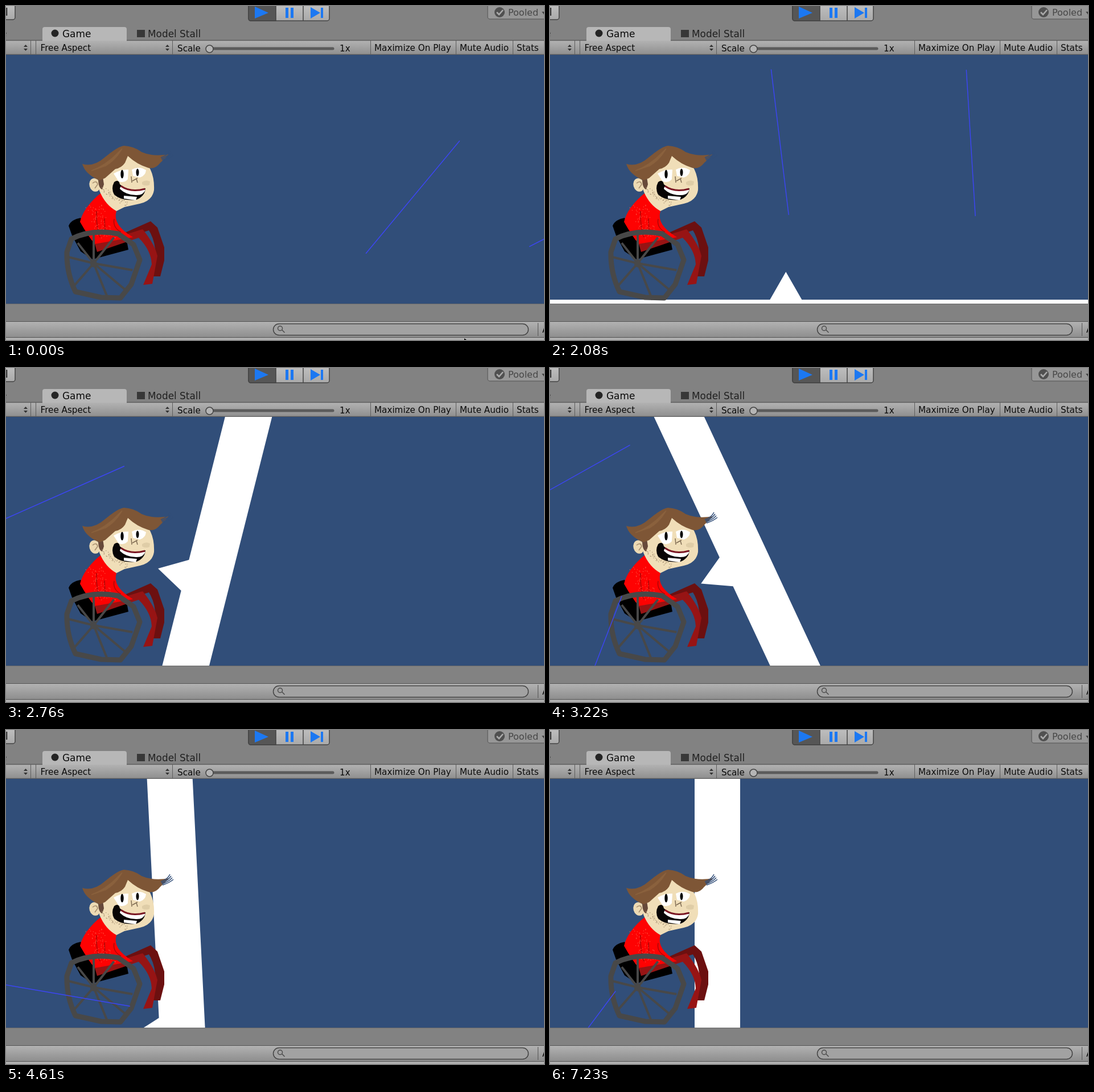
Animation of 945x588 px, one loop 7390 ms. Source, as an HTML page:

```html
<!DOCTYPE html>
<html lang="en">
<head>
<meta charset="utf-8">
<title>Wheelchair game view</title>
<style>
html, body { margin: 0; width: 100%; height: 100%; overflow: hidden; background: #828282; }
svg { display: block; }
text { font: 15.2px "DejaVu Sans", sans-serif; fill: #0b0b0b; }
.tab { font-size: 16.9px; }
.key { stroke: #444; stroke-width: 1.5; }
.line { fill: none; stroke-width: 1.5; }
</style>
</head>
<body>
<svg width="100%" height="100%" viewBox="0 0 945 588">
  <defs>
    <linearGradient id="bar" x2="0" y2="1"><stop stop-color="#b2b2b2"/><stop offset="1" stop-color="#8e8e8e"/></linearGradient>
    <linearGradient id="face" x2="0" y2="1"><stop stop-color="#c4c4c4"/><stop offset="1" stop-color="#a9a9a9"/></linearGradient>
    <clipPath id="view"><path d="M0 86H945V524H0z"/></clipPath>
  </defs>

  <!-- editor bars -->
  <path fill="#828282" d="M0 0H945V588H0z"/>
  <g class="key" fill="url(#face)">
    <rect x="-20" y="-9" width="36" height="33" rx="4"/>
    <rect x="426" y="-9" width="142" height="35" rx="4"/>
    <path fill="#565656" d="M474-9V26H430Q426 26 426 22V-9z"/>
    <path d="M522 0V26"/>
    <rect x="846" y="-9" width="120" height="32" rx="4" fill="#979797" stroke="#666"/>
  </g>
  <path fill="#1c78f2" d="M437 1L461 12 437 22zM491 3h5v18h-5zM500 3h5v18h-5zM535 2L552 12 535 22zM553 3h4v18h-4z"/>
  <circle cx="867" cy="11" r="9" fill="#505050"/>
  <path fill="none" stroke="#aaa" stroke-width="2.6" d="M862 11l4 4 7-8"/>
  <text x="-1" y="17" class="tab">l</text>
  <text x="882" y="17" class="tab" style="fill:#474747;font-size:16px">Pooled</text>
  <path fill="#444" d="M941 10h8l-4 5z"/>
  <path fill="#b7b7b7" d="M64 61V41Q64 37 68 37H208Q212 37 212 41V61z"/>
  <circle cx="86" cy="48" r="6.5" fill="#242424"/>
  <path fill="#383838" d="M230 42h14v13h-14z"/>
  <text x="-9" y="54" class="tab">e</text>
  <text x="99" y="54.5" class="tab">Game</text>
  <text x="249" y="54.5" class="tab" style="fill:#202020">Model Stall</text>

  <path fill="url(#bar)" d="M0 61H945V86H0z"/>
  <path class="line" stroke="#5d5d5d" d="M0 60.500H64M212 60.500H945M0 85.500H945"/>
  <path id="splits" stroke="#5d5d5d"/>
  <path id="arrows" fill="#333"/>
  <text x="60.500" y="78.500">Free Aspect</text>
  <text x="301" y="79.500">Scale</text>
  <path stroke="#5b5b5b" stroke-width="5" stroke-linecap="round" d="M359 75H574"/>
  <circle cx="357.500" cy="75.500" r="6.500" fill="#b5b5b5" class="key"/>
  <text x="586" y="79.500">1x</text>
  <text x="647" y="78.500">Maximize On Play</text>
  <text x="797" y="78.500">Mute Audio</text>
  <text x="897" y="78.500">Stats</text>

  <path fill="url(#bar)" d="M0 556H945V583H0z"/>
  <path fill="#b0b0b0" d="M0 584H945V588H0z"/>
  <path stroke="#555" d="M0 555.500H945M0 583.500H945M934.500 558V581"/>
  <path stroke="#6b6b6b" stroke-width="2" d="M0 524H945"/>
  <rect x="469.500" y="559.500" width="448" height="20" rx="10" fill="#a2a2a2" class="key"/>
  <path class="line" stroke="#4c4c4c" d="M484.500 570l5 5M485.500 567.500a4 4 0 1 1-8 0a4 4 0 1 1 8 0"/>
  <text x="942" y="575">A</text>
  <path id="cursor" d="M805 585l4 3h-4z"/>

  <g clip-path="url(#view)">
    <path fill="#314e79" d="M0 86H945V524H0z"/>
    <!-- the tip of the spike is the local origin -->
    <path id="ground" fill="#fff" d="M0 0L28 49H2500V129H-570V49H-28z"/>

    <g stroke-linejoin="round">
      <!-- chair, legs, shirt -->
      <path d="M110 387Q114 376 131 373L158 416 212 413 215 429 152 446 131 432 116 404z"/>
      <path fill="#6c1010" d="M209 399L254 379 266 390 278 425V448L271 476H258Q270 425 251 395L215 407z"/>
      <path fill="#971414" d="M156 419L240 393Q261 419 266 440L257 489 241 491 256 455Q255 430 233 408L160 433z"/>
      <path fill="#fe0202" d="M168 328Q177 350 194 361 186 385 223 407L156 419Q144 405 130 380 136 354 168 328z"/>
      <path class="line" stroke="#aa0707" d="M159 361Q158 387 165 407M173 374l1 24M190 375Q187 390 202 398"/>
      <path id="specks" fill="#ff4a3a"/>
      <path id="spokes" stroke="#484848" stroke-width="4"/>
      <circle cx="154" cy="454" r="6" fill="#484848"/>
      <path fill="none" stroke="#484848" stroke-width="9" d="M107 433L115 410Q150 392 197 401L224 420 235 447 220 490 201 514 167 513 122 503Q106 470 107 433z"/>

      <!-- head -->
      <ellipse cx="156" cy="315" rx="9.500" ry="12" fill="#eddab3" transform="rotate(-15 156 315)"/>
      <path class="line" stroke="#a58c6d" d="M152 312q7-6 9 2l-5 7"/>
      <path fill="#f0deb8" d="M164 298L214 260 251 283Q261 299 260 324 257 343 235 348L208 354 194 361Q174 350 164 325z"/>
      <path fill="#67493a" d="M162 304l8-3 2 13-3 9q-7-2-7-19z"/>
      <path id="stubble" fill="#aa9474"/>
      <path fill="#dfcda7" d="M239 310q7-5 14-1l-1 6q-7 3-13-1z"/>
      <path fill="#fff" d="M189 295Q202 287 215 288L214 305Q208 312 198 309zM221 288Q234 281 246 289 245 299 235 302L223 299z"/>
      <ellipse cx="204" cy="296" rx="2.700" ry="7.500"/>
      <ellipse cx="231" cy="293" rx="2.500" ry="6.500"/>
      <path class="line" stroke="#806d54" d="M220 300l1 11M222 308l9-5M229 304l2 7"/>
      <path fill="#080505" d="M190 310Q198 304 200 314 217 329 245 321 244 335 229 341 203 344 190 332 184 321 190 310z"/>
      <path fill="#fff" d="M201 318Q220 329 245 323 242 333 229 333 211 333 200 322zM207 334l23 2-2 6-21-3z"/>
      <path fill="none" stroke="#7a1622" stroke-width="3" d="M202 317Q219 329 244 322"/>
      <path id="hair" fill="#7e5636" d="M134 278Q154 284 174 266 197 247 207 246 225 247 238 257 258 266 287 261L271 276Q262 288 250 285 230 279 214 264L209 276Q203 285 192 287L174 303 164 307Q139 296 134 278z"/>
      <path id="strands" class="line" stroke="#8a613d"/>
      <path id="wisps" class="line" stroke="#314e79"/>
    </g>
    <g stroke="#3c45f7" stroke-width="1.400">
      <path id="rayA" d="M-129 0H129"/>
      <path id="rayB" d="M-129 0H129"/>
    </g>
  </g>
</svg>
<script>
const LOOP = 7390, STEP = 77, STALL = 140, RESUME = 1150, SKIP = 600, HIT = 1.782;
const el = id => document.getElementById(id);
const clamp = p => Math.max(0, Math.min(1, p));
const out = (p, n) => 1 - (1 - clamp(p)) ** n;
const smooth = p => (p = clamp(p), p * p * (3 - 2 * p));

let seed = 7;
const rnd = () => (seed = seed * 16807 % 2147483647) / 2147483647;
const shape = (id, items, f) => el(id).setAttribute("d", items.map(f).join(""));
const times = n => [...Array(n).keys()];
const dot = (x, y) => `M${x} ${y}h1.3v1.3h-1.3z`;

// small repeated parts
shape("splits", [43.5, 52.5, 292.5, 640.5, 790.5, 890.5], x => `M${x} 61V85`);
shape("arrows", [31, 280], x => `M${x} 72l3.5-4 3.5 4zm0 3l3.5 4 3.5-4z`);
shape("spokes", [-90, -52, 10, 40, 68, 131, 194, 232], deg => {
  const a = deg * Math.PI / 180, c = Math.cos(a), s = Math.sin(a), r = 58 + 10 * c + 8 * s;
  return `M154 453l${r * c} ${r * s}`;
});
shape("specks", times(90), () => {
  const v = rnd();
  return dot(138 + 22 * v + rnd() * 32, 350 + v * 58);
});
shape("stubble", times(45), () => {
  const u = rnd(), v = rnd();
  return dot(168 + 42 * u + 5 * v, 317 + 34 * Math.sqrt(u) - 7 * v);
});
shape("strands", times(9), i => `M${150 + 3 * i} ${290 - i}Q${176 + 2 * i} ${280 - i} ${196 + i} ${259 - i}`);
shape("wisps", times(4), i => `M${272 + i} ${267 + 2 * i}q12-4 ${16 + i} ${-13 + i}`);

// position and angle of a body in free motion
const flight = (t0, pose, vel, acc) => w =>
  pose.map((p, i) => p + vel[i] * (w - t0) + acc[i] * (w - t0) ** 2);

const throwA = flight(0, [714.5, 336.5, 50.3], [-112, -20, -20], [-67, -31, 35]);
const knockA = flight(2.167, [90, 225, 203.9], [-134, -57, 11.7], [0, 0, 0]);
const throwB = flight(0, [1034, 365, 27], [-144, 84, -21.5], [-38, -114, 45.2]);
const dropB = flight(3.245, [88, 487, 204.4], [9, -44.6, -59.9], [-7, 19.8, 20.2]);

// slides in, is kicked up by the feet, swings past upright and sinks back
function groundPose(w) {
  if (w < HIT) return [931 - 368 * (w - 0.07), 468, 0];
  const u = w - HIT, kick = out(u / 0.385, 4.8), sink = Math.max(0, u - 0.385);
  return [
    300 - 33 * kick - 62 * clamp(sink / 2.1) ** 2.35,
    468 - 115 * kick + 78 * sink ** 1.4,
    116 * out(u / 0.935, 2) - 26 * smooth((u - 0.935) / 1.635)
  ];
}

function place(id, [x, y, a]) {
  el(id).setAttribute("transform", `translate(${x} ${y}) rotate(${-a})`);
}

function draw(t) {
  // the game stalls early on, then jumps ahead
  const q = t < RESUME ? Math.min(Math.floor(t / 70) * 70, STALL)
    : RESUME + Math.floor((t - RESUME + 12) / STEP) * STEP;
  const w = (q < RESUME ? q : q - SKIP) / 1000;
  place("ground", groundPose(w));
  place("rayA", (w < 2.1 ? throwA : knockA)(w));
  place("rayB", (w < 2.3 ? throwB : dropB)(w));
  el("ground").style.display = q ? "" : "none";
  el("cursor").style.display = q ? "none" : "";
}

const start = performance.now();
function tick() {
  draw((performance.now() - start) % LOOP);
  requestAnimationFrame(tick);
}
tick();
</script>
</body>
</html>
```
